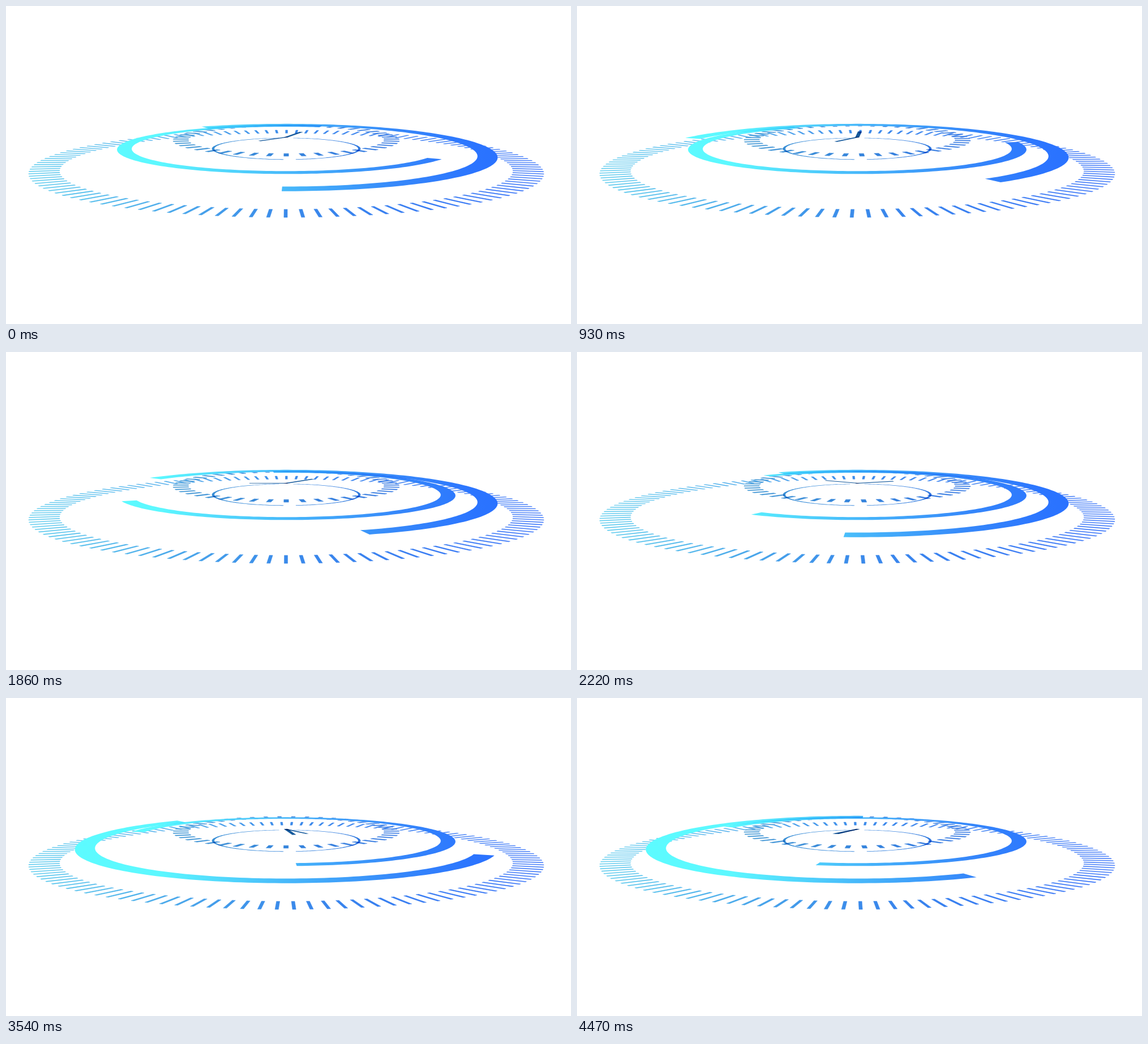
Animation, 998 px wide and 561 px high, one loop 4500 ms. Source, as an HTML page with a canvas:

```html
<!DOCTYPE html>
<html lang="en">
<head>
<meta charset="utf-8">
<title>Tilted dial</title>
<style>
html, body { margin: 0; width: 100%; height: 100%; overflow: hidden; background: #fff; }
canvas { display: block; width: 998px; height: 561px; }
</style>
</head>
<body>
<canvas id="dial" width="998" height="561"></canvas>
<script>
const ctx = document.getElementById('dial').getContext('2d');
const W = 998, H = 561, CX = 495, LOOP = 4500, STEP = 30;
const RAD = Math.PI / 180, DEPTH = 0.00058;

// Angles in degrees, clockwise from the right, at each key time.
const TIMES = [0, 930, 1500, 2220, 2880, 3540, 4470];
const KEYS = {
  wide: [91, 55, 57, 93, 156, 232, 272],
  narrow: [284.5, 244, 195, 123, 94, 87, 102],
  outerTicks: [0, 0.84, 0.84, -1.16, -3, -4.47, -6.7],
  innerTicks: [0, 5.8, 10.7, 20.8, 23, 24.1, 20.5],
  longHand: [137, 126, 157, 210, 310, 415, 483],
  shortHand: [293, 274, 290, 340, 380, 438, 487]
};

// A flat ring seen in perspective: outer and inner radius, tilt, centre height.
const ring = (outer, inner, tilt, y) => ({ outer, inner, tilt, y });
const RINGS = {
  outerTicks: ring(440, 390, 0.1636, 276.3),
  wide: ring(365, 331.5, 0.1555, 254.7),
  narrow: ring(294.5, 269.5, 0.1417, 246),
  innerTicks: ring(198.7, 172, 0.139, 233.8),
  thin: ring(131, 126.5, 0.1465, 250.4)
};

function gradient(x0, x1, stops) {
  const g = ctx.createLinearGradient(x0, 0, x1, 0);
  stops.forEach(([at, color]) => g.addColorStop(at, color));
  return g;
}
const bandFill = gradient(122, 868, [
  [0, '#5cfbff'], [0.2, '#5cf8ff'], [0.5, '#47b8fa'], [0.76, '#3688fa'], [0.95, '#2b74ff'], [1, '#2a72ff']
]);
const tickFill = gradient(40, 950, [
  [0, '#50c8ec'], [0.3, '#46a4ea'], [0.5, '#3a8aea'], [0.75, '#347af2'], [1, '#2f6cf8']
]);
const coreFill = gradient(295, 695, [[0, '#3a94d2'], [0.5, '#3584dc'], [1, '#2f74e2']]);

function slope(v, i) {
  const a = Math.max(0, i - 1), b = Math.min(v.length - 1, i + 1);
  return (v[b] - v[a]) / (TIMES[b] - TIMES[a]);
}

function valueAt(v, t) {
  let i = 0;
  while (i < TIMES.length - 2 && t >= TIMES[i + 1]) i++;
  const d = TIMES[i + 1] - TIMES[i];
  const u = Math.min(1, (t - TIMES[i]) / d), u2 = u * u, u3 = u2 * u;
  return v[i] * (2 * u3 - 3 * u2 + 1) + v[i + 1] * (3 * u2 - 2 * u3) +
    d * (slope(v, i) * (u3 - 2 * u2 + u) + slope(v, i + 1) * (u3 - u2));
}

function project({ tilt, y }, r, deg) {
  const c = Math.cos(deg * RAD), s = Math.sin(deg * RAD);
  const k = r / (1 - DEPTH * r * s);
  return [CX + c * k, y + s * k * tilt];
}

function fillPoly(points, fill) {
  ctx.beginPath();
  points.forEach(([x, y]) => ctx.lineTo(x, y));
  ctx.closePath();
  ctx.fillStyle = fill;
  ctx.fill();
}

function band(g, from, to, fill) {
  const n = Math.ceil((to - from) / 1.5);
  const pts = [];
  for (let i = 0; i <= n; i++) pts.push(project(g, g.outer, from + (to - from) * i / n));
  for (let i = n; i >= 0; i--) pts.push(project(g, g.inner, from + (to - from) * i / n));
  fillPoly(pts, fill);
}

function ticks(g, count, start, width, fill) {
  const a = width / 2 / g.outer / RAD, b = width / 2 / g.inner / RAD;
  ctx.strokeStyle = fill;
  ctx.lineWidth = 0.5;
  for (let i = 0; i < count; i++) {
    const deg = start + i * 360 / count;
    fillPoly([
      project(g, g.outer, deg - a), project(g, g.outer, deg + a),
      project(g, g.inner, deg + b), project(g, g.inner, deg - b)
    ], fill);
    ctx.stroke();
  }
}

function hand(deg, length, width) {
  ctx.save();
  ctx.translate(CX, 231.5);
  ctx.scale(1, 0.15);
  ctx.rotate(deg * RAD);
  ctx.fillStyle = '#14599c';
  ctx.fillRect(-3, -width / 2, length + 3, width);
  ctx.restore();
}

function draw(t) {
  const at = name => valueAt(KEYS[name], t);
  const wide = at('wide'), narrow = at('narrow');
  const bands = fill => {
    band(RINGS.wide, wide + 150, wide + 360, fill);
    band(RINGS.narrow, narrow + 107.5, narrow + 360, fill);
  };

  ctx.globalCompositeOperation = 'source-over';
  ctx.fillStyle = '#fff';
  ctx.fillRect(0, 0, W, H);
  ticks(RINGS.outerTicks, 120, 90.1 + at('outerTicks'), 4.6, tickFill);
  ticks(RINGS.innerTicks, 45, 90 + at('innerTicks'), 7.5, coreFill);

  // The bands hide the ticks but darken each other.
  bands('#fff');
  ctx.globalCompositeOperation = 'multiply';
  bands(bandFill);

  band(RINGS.thin, 92, 264, coreFill);
  band(RINGS.thin, 276, 443, coreFill);
  hand(at('longHand'), 65, 6);
  hand(at('shortHand'), 68, 7);
}

const begin = performance.now();
function frame() {
  const t = (performance.now() - begin) % LOOP;
  draw(Math.floor(t / STEP) * STEP);
  requestAnimationFrame(frame);
}
frame();
</script>
</body>
</html>
```
